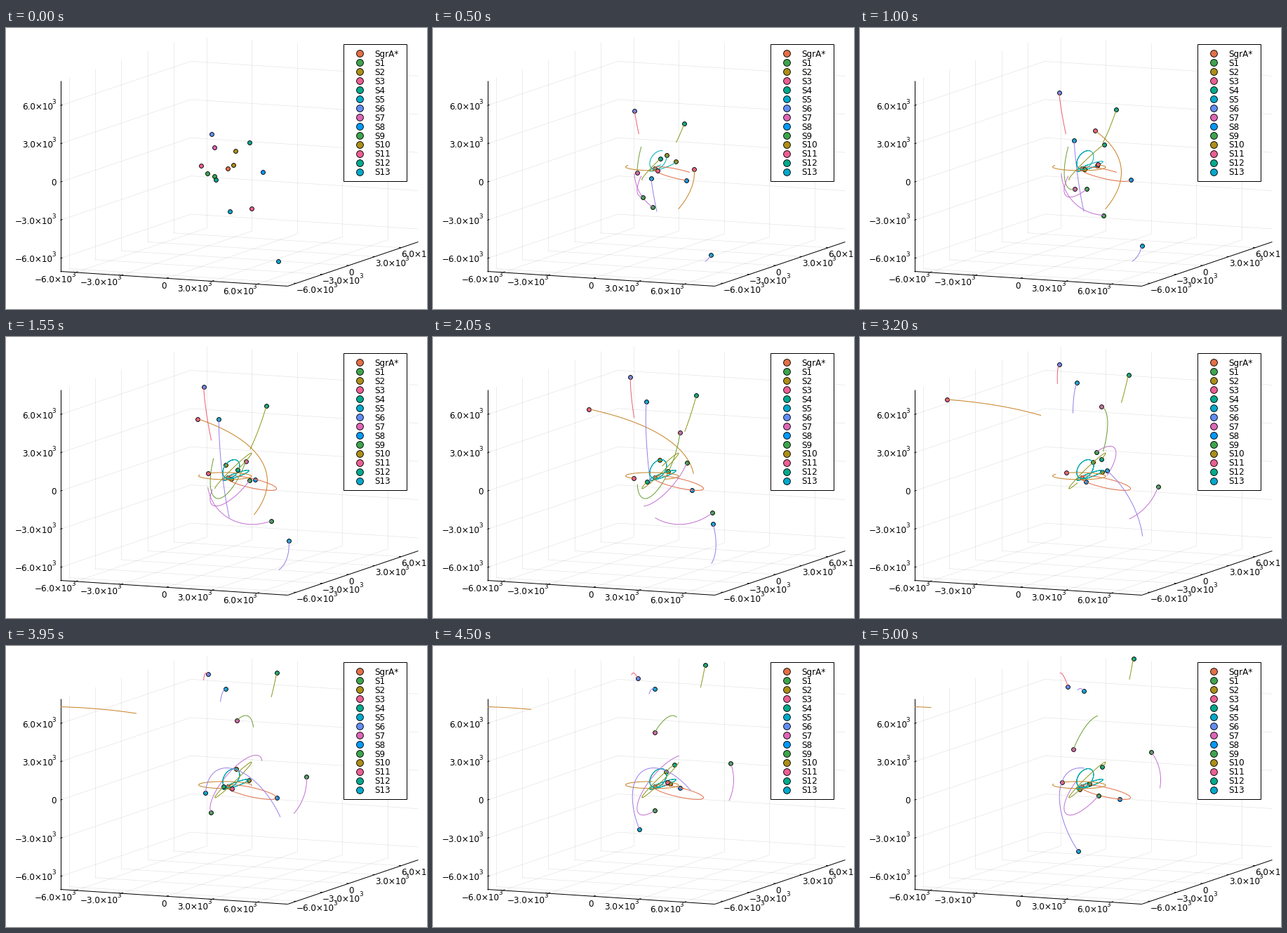
Recreate the animation shown at these times as a matplotlib script. Size 600x400 px, loop 5.05 s.

```python
import numpy as np
import matplotlib.pyplot as plt
from matplotlib.animation import FuncAnimation
from matplotlib.patches import Rectangle

FRAMES, TAIL = 101, 30
PX = 0.72                      # points per pixel at 100 dpi
FONT = 12 * PX
CENTER = np.array([316.0, 200.5])
TIMES = (0, 20, 41, 64, 100)

PALETTE = ["#009afa", "#e36f47", "#3ea44e", "#c371d2", "#ac8e18", "#00aaae",
           "#ed5e93", "#c68225", "#00a98d", "#8e971e", "#00a9cc", "#9b7fe9",
           "#618df6", "#f06073", "#dd65b6", "#6c9f33"]

plt.rcParams["font.family"] = "DejaVu Sans"
fig = plt.figure(figsize=(6, 4), dpi=100, facecolor="white")
ax = fig.add_axes([0, 0, 1, 1])
ax.set_xlim(0.5, 600.5)
ax.set_ylim(400.5, 0.5)
ax.axis("off")


# ---- Kepler orbits seen in projection ----

def anomaly(mean, ecc):
    mean = (mean + np.pi) % (2 * np.pi) - np.pi
    e_anom = mean + 0.85 * ecc * np.sign(mean)
    for _ in range(12):
        e_anom = e_anom - ((e_anom - ecc * np.sin(e_anom) - mean)
                           / (1 - ecc * np.cos(e_anom)))
    return e_anom


def basis(t, period, ecc, t_peri):
    e_anom = anomaly(2 * np.pi * (t - t_peri) / period, ecc)
    return np.cos(e_anom) - ecc, np.sin(e_anom)


def solve_orbit(times, points, period, slack):
    """Kepler orbit about CENTER through a few key points: zooming search
    over period, eccentricity and periapsis time, with the two ellipse
    axes found by least squares."""
    t = np.array(times, float)
    pos = (np.array(points, float) - CENTER).T
    span = np.log(period) + np.array([-1, 1]) * np.log(slack)
    mid = np.array([np.log(period), -3.0, 50.0])
    half = np.array([np.log(slack), 3.0, min(period * slack / 2, 130)])
    sizes = np.array([13, 15, 61])
    best_err, best = np.inf, None
    for step in range(28):
        axes = [np.linspace(m - h, m + h, n)
                for m, h, n in zip(mid, half, sizes)]
        axes[0] = np.clip(axes[0], *span)
        axes[1] = np.clip(axes[1], -6, 0)
        log_p, log_q, peri = [g.reshape(-1, 1) for g in
                              np.meshgrid(*axes, indexing="ij")]
        p, ecc = np.exp(log_p), 1 - np.exp(log_q)
        c, s = basis(t, p, ecc, peri)
        cc, cs, ss = [(u * v).sum(1)[:, None]
                      for u, v in ((c, c), (c, s), (s, s))]
        pc, ps = c @ pos.T, s @ pos.T
        det = cc * ss - cs * cs + 1e-12
        a = (pc * ss - ps * cs) / det
        b = (ps * cc - pc * cs) / det
        model = a[:, :, None] * c[:, None] + b[:, :, None] * s[:, None]
        err = ((model - pos) ** 2).sum((1, 2))
        k = int(np.argmin(err))
        mid = np.array([log_p[k, 0], log_q[k, 0], peri[k, 0]])
        if err[k] < best_err:
            best_err = err[k]
            best = p[k, 0], ecc[k, 0], peri[k, 0], a[k], b[k]
        half = 6 * half / sizes if step == 0 else 0.7 * half
        sizes = np.array([11, 11, 11])
    return best


def place(orbit, t):
    period, ecc, t_peri, a, b = orbit
    c, s = basis(t, period, ecc, t_peri)
    return CENTER[0] + a[0] * c + b[0] * s, CENTER[1] + a[1] * c + b[1] * s


# ---- static scene ----

def line(p, q, **kw):
    ax.plot([p[0], q[0]], [p[1], q[1]], solid_capstyle="butt", **kw)


def tick_label(x, y, value, ha):
    if value == 0:
        ax.text(x, y + 4.3, "0", ha=ha, va="baseline", fontsize=FONT)
        return
    text = f"{value:.1f}×10".replace("-", "−")
    shift = 4.4 if ha == "right" else 0
    main = ax.text(x - shift, y + 4.3, text, ha=ha, va="baseline",
                   fontsize=FONT)
    ax.annotate("3", xy=(1, 1), xycoords=main, xytext=(-1.1, 0.4),
                textcoords="offset points", ha="left", va="center",
                fontsize=FONT * 0.74)


def draw_box():
    grid = dict(color="black", alpha=0.1, lw=0.5, zorder=0)
    axis = dict(color="black", lw=PX, zorder=1)
    for i in range(5):
        value = 3.0 * (i - 2)
        z = 328.5 - 54.4 * i
        line((78, z), (264, z - 63), **grid)
        line((264, z - 63), (588, z - 42), **grid)
        line((78, z), (81, z - 1), **axis)
        tick_label(72, z + 0.9, value, "right")

        x = 100 + 64.6 * i
        y = 347 + (x - 78) * 21 / 324
        line((x, y), (x + 186, y - 63), **grid)
        line((x + 186, y - 63), (x + 186, y - 335), **grid)
        line((x, y), (x + 3, y - 1), **axis)
        tick_label(x - 0.3, y + 10, value, "right")

        x = 414 + 37.4 * i
        y = 368 - (x - 402) * 63 / 186
        line((x, y), (x - 324, y - 21), **grid)
        line((x - 324, y - 21), (x - 324, y - 293), **grid)
        line((x, y), (x - 3, y - 0.2), **axis)
        tick_label(x + 0.2, y + 9.2, value, "left")
    line((78, 75), (78, 347), **axis)
    line((78, 347), (402, 368), **axis)
    line((402, 368), (588, 305), **axis)


def dot(x, y, color, size, z):
    return ax.plot([x], [y], "o", ms=size * PX, mfc=color, mec="black",
                   mew=0.9 * PX, zorder=z)[0]


def draw_legend(colors):
    ax.add_patch(Rectangle((481, 23), 90, 195, fc="white", ec="black",
                           lw=PX, zorder=50))
    for i, color in enumerate(colors):
        y = 36.8 + 12.97 * i
        dot(504.5, y, color, 9.8, 51)
        ax.text(526, y + 4.5, f"S{i}" if i else "SgrA*", va="baseline",
                fontsize=FONT, zorder=51)


# ---- stars ----

stars = []


def add_star(period, *points, times=TIMES, slack=1.02):
    """Period in frames, known up to a factor of slack."""
    k = 2 + 2 * len(stars)
    color, trail = PALETTE[k % 16], PALETTE[(k + 1) % 16]
    z = 5 + len(stars)
    mark = dot(0, 0, color, 5.9, z)
    tail, = ax.plot([], [], color=trail, lw=PX, zorder=z + 0.5)
    tail.set_clip_path(Rectangle((78, 14), 510, 354, transform=ax.transData))
    stars.append((solve_orbit(times, points, period, slack), mark, tail))
    return color


colors = [
    PALETTE[1],
    add_star(400, (287.5, 208), (348, 267), (398.5, 251), (425.5, 213),
             (415.5, 151.5), slack=3.5),
    add_star(13.95, (325, 195.5), (339, 196), (336, 192), (345, 192.5),
             (314, 204.5)),
    add_star(4000, (350.5, 258), (371.5, 194.5), (335.5, 147), (223, 103),
             (124, 89.5), times=(0, 11, 20, 41, 64), slack=8),
    add_star(700, (347, 163), (366, 117), (376, 83.5), (383, 54.5),
             (390, 18), slack=5),
    add_star(450, (319.5, 261.5), (305.5, 160.5), (304.5, 92.5),
             (309.5, 66), (319, 64), slack=3.5),
    add_star(450, (294, 151), (284, 93), (281.5, 57), (284.5, 40),
             (297, 58), slack=3.5),
    add_star(109, (297, 170), (306.5, 230), (352.5, 136), (344.5, 100),
             (304.5, 148)),
    add_star(29.5, (366, 206), (386, 216.5), (369.5, 218.5), (322.5, 207),
             (371, 218.5)),
    add_star(73.3, (297, 211.5), (323.5, 230), (362, 180), (337.5, 164),
             (340.5, 213.5)),
    add_star(13.25, (327.5, 175), (320, 201.5), (324, 175.5), (332, 178.5),
             (328, 196.5)),
    add_star(34.3, (278, 196), (339, 195), (286.5, 202), (294.5, 194),
             (288, 194.5)),
    add_star(36.2, (299, 216.5), (348.5, 166), (305.5, 206.5),
             (345, 174.5), (346, 173)),
    add_star(230, (388.5, 332.5), (402.5, 310.5), (399.5, 266.5),
             (352.5, 191), (311.5, 292.5), slack=2.1),
]

draw_box()
dot(*CENTER, colors[0], 5.9, 4)
draw_legend(colors)


def update(i):
    span = np.linspace(max(0, i - TAIL), i, 12 * min(i, TAIL) + 1)
    changed = []
    for orbit, mark, tail in stars:
        x, y = place(orbit, span)
        tail.set_data(x, y)
        mark.set_data(x[-1:], y[-1:])
        mark.set_visible(bool(x[-1] >= 78))
        changed += [mark, tail]
    return changed


anim = FuncAnimation(fig, update, frames=FRAMES, interval=50, repeat=True,
                     repeat_delay=0, blit=False)
plt.show()
```
